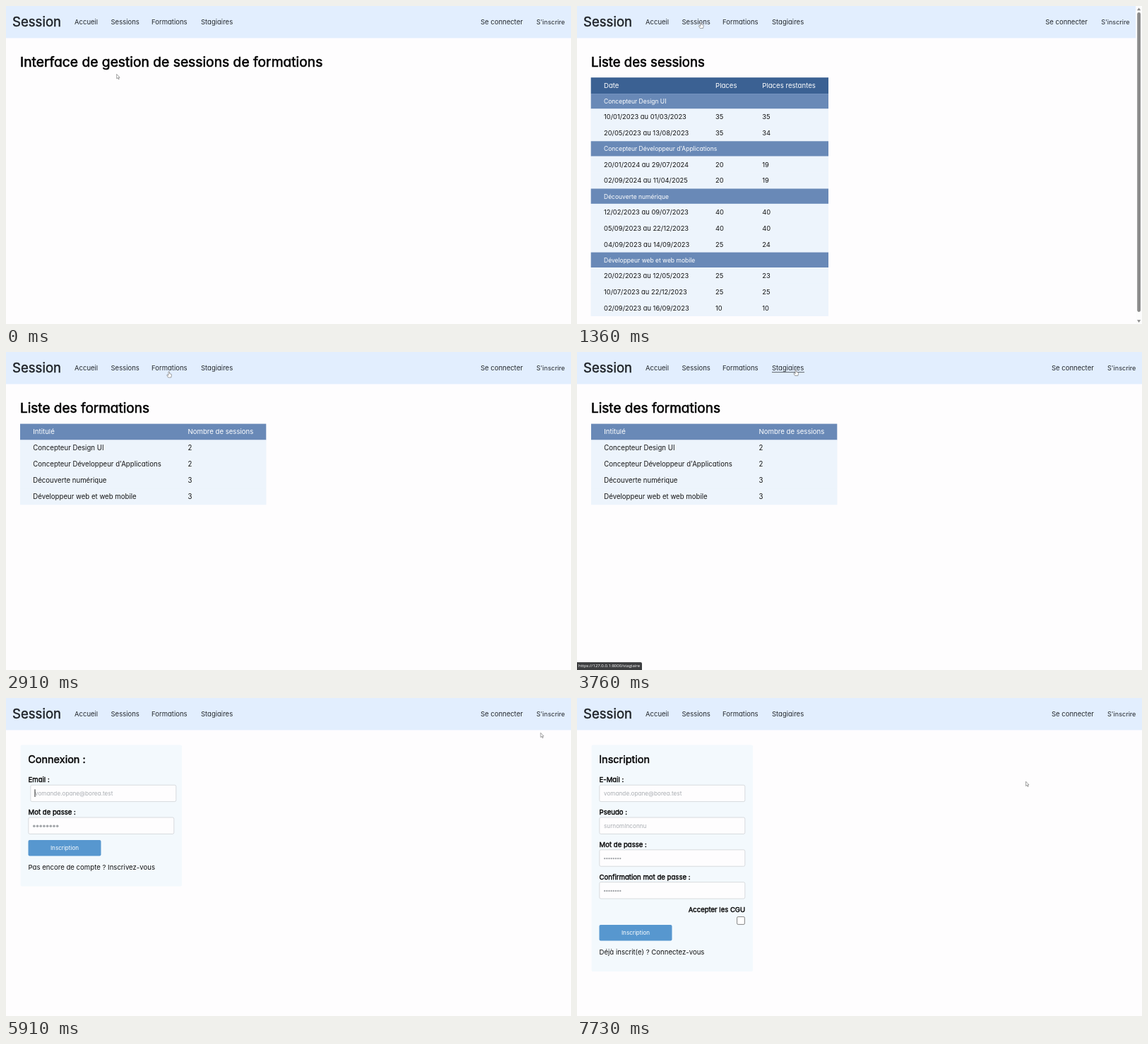
Animation of 800 by 450 pixels, one loop 7760 ms. Source, as an HTML page:

```html
<!DOCTYPE html>
<html lang="fr">
<head>
<meta charset="utf-8">
<title>Session</title>
<style>
html, body { margin: 0; width: 100%; height: 100%; overflow: hidden; background: #fefdfe; }
svg { position: absolute; left: 0; top: 0; width: 800px; height: 450px; font-family: Inter, "Open Sans", sans-serif; font-feature-settings: "cv11"; }
.bold { stroke: currentColor; paint-order: stroke; }
#status { position: absolute; left: 0; top: 439.3px; height: 10.7px; padding: 0 3px 0 2px; background: #202124; color: #fff;
  font: 6px/10.4px "Open Sans", sans-serif; border-top-right-radius: 2px; white-space: nowrap; }
</style>
</head>
<body>
<svg viewBox="0 0 800 450">
  <rect id="bar" width="800" height="45.4" fill="#e2eefe"/>
  <g id="nav"></g>
  <g id="right"></g>
  <g id="pages"></g>
  <path id="line" stroke="#3a3f45" stroke-width=".8"/>
</svg>
<div id="status"></div>
<svg viewBox="0 0 800 450">
  <g id="cursor" fill="#fff" stroke="#555" stroke-width=".55" stroke-linejoin="round">
    <path id="arrow" d="M0 0V6.3L1.5 5 2.6 7.3 3.5 6.9 2.5 4.7H4.4Z"/>
    <path id="hand" d="M-.3 0Q.5 -1 1.3 0V2.6L3.8 3.4Q4.3 3.7 4.1 4.9L3.5 8H-.7L-2.5 5Q-2.5 3.8 -1.4 4.3L-.3 5.2Z"/>
  </g>
</svg>
<script>
const LOOP = 7760;
const $ = id => document.getElementById(id);

const text = (x, y, s, size = 9.6, color = '#111', more = '') =>
  `<text x="${x}" y="${y}" font-size="${size}" fill="${color}" ${more}>${s}</text>`;
const bold = (x, y, s, size, width, color = '#000', more = '') =>
  text(x, y, s, size, color, `class="bold" style="color:${color};stroke-width:${width}" ${more}`);
const rect = (x, y, w, h, fill, more = '') =>
  `<rect x="${x}" y="${y}" width="${w}" height="${h}" fill="${fill}" ${more}/>`;
const title = (s, size = 19) => bold(20, 85.6, s, size, .6);

// Row kinds: height, background, text colour, text size
const KINDS = {
  dark: [22.9, '#3b6193', '#fff', 9.6],
  head: [22.9, '#6989b7', '#fff', 9.6],
  sub: [21.4, '#6989b7', '#fff', 8.5],
  row: [22.9, '#edf4fc', '#151515', 9.65],
  date: [22.9, '#edf4fc', '#151515', 9.35]
};

function table(left, top, width, cols, rows) {
  let y = top, fills = '', texts = '';
  for (const [kind, ...cells] of rows) {
    const [h, fill, color, size] = KINDS[kind];
    fills += rect(left, y, width, h, fill);
    cells.forEach((c, i) => texts += text(cols[i], y + h / 2 + 3.4, c, size, color));
    y += h;
  }
  // The backing hides seams between rows
  return rect(left, top + 1, width, y - top - 1, KINDS.row[1]) + fills + texts;
}

const scrollbar = rect(791.3, 0, 8.7, 450, '#fcfcfc') + rect(793.2, 9, 4.8, 424, '#8b8b8b', 'rx="2.4"') +
  '<path d="M793 6.3 795.6 2.6 798.2 6.3ZM793 444.3 795.6 448 798.2 444.3Z" fill="#8b8b8b"/>';

const card = h => rect(20.5, 66.5, 228.5, h, '#f3f9fd', 'rx="2"');
const box = y => rect(31.8, y, 206, 23.4, '#fefdfe', 'rx="2" stroke="#cfd2d6" stroke-width=".8"');
const hint = (y, s) => text(38, y + 14.6, s, 8.2, '#a9adb2');
const label = (y, s) => bold(31.5, y, s, 9.6, .35);
const dots = (y, r, step) => Array.from({ length: 8 }, (_, i) =>
  `<circle cx="${38 + r + i * step}" cy="${y + 12.3}" r="${r}" fill="#a3a6aa"/>`).join('');
const button = y => rect(31.5, y, 103, 22.6, '#5797cf', 'rx="2"') +
  text(83, y + 14.2, 'Inscription', 8.1, '#fff', 'text-anchor="middle"');
const mail = 'vomande.opane@borea.test';

const pages = [
  { start: 0, body: title('Interface de gestion de sessions de formations', 19.25) },
  { start: 1360, scroll: true, body: title('Liste des sessions', 18.6) + scrollbar +
    table(19.7, 101.2, 336.3, [38, 196, 262.3], [
      ['dark', 'Date', 'Places', 'Places restantes'],
      ['sub', 'Concepteur Design UI'],
      ['date', '10/01/2023 au 01/03/2023', 35, 35],
      ['date', '20/05/2023 au 13/08/2023', 35, 34],
      ['sub', 'Concepteur Développeur d\'Applications'],
      ['date', '20/01/2024 au 29/07/2024', 20, 19],
      ['date', '02/09/2024 au 11/04/2025', 20, 19],
      ['sub', 'Découverte numérique'],
      ['date', '12/02/2023 au 09/07/2023', 40, 40],
      ['date', '05/09/2023 au 22/12/2023', 40, 40],
      ['date', '04/09/2023 au 14/09/2023', 25, 24],
      ['sub', 'Développeur web et web mobile'],
      ['date', '20/02/2023 au 12/05/2023', 25, 23],
      ['date', '10/07/2023 au 22/12/2023', 25, 25],
      ['date', '02/09/2023 au 16/09/2023', 10, 10]
    ]) },
  { start: 2790, body: title('Liste des formations') + table(20, 101.6, 348.3, [38.3, 257.5], [
      ['head', 'Intitulé', 'Nombre de sessions'],
      ['row', 'Concepteur Design UI', 2],
      ['row', 'Concepteur Développeur d\'Applications', 2],
      ['row', 'Découverte numérique', 3],
      ['row', 'Développeur web et web mobile', 3]
    ]) },
  { start: 4120, body: title('Liste de stagiaires') + table(20, 101.6, 213.8, [38.3, 165], [
      ['head', 'Nom', 'Ville'],
      ['row', 'BELVORNAY Lucien', 'Strasbourg'],
      ['row', 'KERVALD Mélinor', 'Strasbourg'],
      ['row', 'IVOLA Zoé', 'Mulhouse']
    ]) },
  { start: 5480, body: card(200) + bold(31.2, 92, 'Connexion :', 14.5, .45) +
    label(119.4, 'Email :') + `<g id="email">${box(123.2)}${hint(123.2, mail)}` +
    '<path id="caret" d="M38 129.3V140" stroke="#111" stroke-width=".9"/></g>' +
    label(165.2, 'Mot de passe :') + box(169) + dots(169, 1.8, 4.7) + button(201) +
    text(31.5, 243, 'Pas encore de compte ? Inscrivez-vous') },
  { start: 6780, body: card(320.5) + bold(31.2, 92, 'Inscription', 14.5, .45) +
    ['E-Mail :', 'Pseudo :', 'Mot de passe :', 'Confirmation mot de passe :'].map((s, i) => {
      const y = 123.2 + i * 45.8;
      return label(y - 3.8, s) + box(y) + (i < 2 ? hint(y, [mail, 'surnomInconnu'][i]) : dots(y, 1.2, 3.15));
    }).join('') +
    bold(238, 303.2, 'Accepter les CGU', 9.5, .35, '#000', 'text-anchor="end"') +
    rect(226.6, 309.6, 10.8, 10.8, '#fff', 'rx="1.5" stroke="#767676" stroke-width=".9"') +
    button(321) + text(31.5, 362.6, 'Déjà inscrit(e) ? Connectez-vous') }
];

// Links: left, right, label, text size
const links = [
  [97, 130, 'Accueil'], [148.5, 188, 'Sessions'], [206, 258, 'Formations'], [276, 322, 'Stagiaires'],
  [672, 732.3, 'Se connecter'], [751, 790.8, 'S\'inscrire', 9.1]
];
const linkText = ([x, , s, size = 9.5]) => text(x, 25.9, s, size, '#24292e');
$('nav').innerHTML = bold(9, 29.4, 'Session', 18.6, .4, '#1d2126') + links.slice(0, 4).map(linkText).join('');
$('right').innerHTML = links.slice(4).map(linkText).join('');
$('pages').innerHTML = pages.map(p => `<g>${p.body}</g>`).join('');

// Status bubble: appears, gone, path
const bubbles = [
  [850, 1150, 'session'], [2160, 2640, 'formation'], [3580, 3970, 'stagiaire'],
  [5010, 5330, 'login'], [6300, 6620, 'register']
];

// Pointer stops: time, x, y
const stops = [
  [0, 156.7, 96.5], [30, 156.7, 96.5], [790, 175, 23.5], [1600, 175, 23.5], [2150, 230.3, 28],
  [2950, 230.3, 28], [3560, 309.4, 25.5], [4230, 309.4, 25.5], [5030, 721.3, 26.5], [5560, 721.3, 26.5],
  [5910, 757, 49.3], [6240, 766, 27.5], [6990, 766, 27.5], [7390, 663, 119], [7570, 663, 119],
  [7730, 635.6, 118.2], [LOOP, 635.6, 118.2]
];
const clamp = v => Math.max(0, Math.min(1, v));

function pointer(t) {
  const i = stops.findIndex(s => s[0] > t);
  const [t0, x0, y0] = stops[i - 1], [t1, x1, y1] = stops[i];
  const u = (t - t0) / (t1 - t0), k = u * u * (3 - 2 * u);
  return [x0 + (x1 - x0) * k, y0 + (y1 - y0) * k];
}

function draw(t) {
  const page = pages.findLast(p => p.start <= t);
  [...$('pages').children].forEach((g, i) => g.style.display = pages[i] === page ? '' : 'none');
  $('bar').setAttribute('width', page.scroll ? 791.3 : 800);
  $('right').setAttribute('transform', `translate(${page.scroll ? -8.8 : 0})`);

  const [x, y] = pointer(t);
  const link = y < 32 && links.find(l => x >= l[0] && x <= l[1]);
  // A fresh page only shows its hover style once the pointer has moved
  const [px, py] = pointer(page.start);
  const moved = Math.hypot(x - px, y - py) > .1;
  $('line').setAttribute('d', link && moved ? `M${link[0]} 28.6H${link[1]}` : '');
  $('cursor').setAttribute('transform', `translate(${x} ${y})`);
  $('hand').style.display = link ? '' : 'none';
  $('arrow').style.display = link ? 'none' : '';

  const bubble = bubbles.find(b => t >= b[0] && t < b[1]);
  $('status').style.opacity = bubble ? Math.min(clamp((t - bubble[0]) / 210), clamp((bubble[1] - t) / 90)) : 0;
  if (bubble) $('status').textContent = 'https://127.0.0.1:8000/' + bubble[2];

  const age = t - 5480;
  $('email').setAttribute('transform', `translate(${3 * clamp(age / 300)})`);
  $('caret').style.display = age % 1060 < 530 ? '' : 'none';
}

const begin = performance.now();
function tick() {
  draw((performance.now() - begin) % LOOP);
  requestAnimationFrame(tick);
}
tick();
</script>
</body>
</html>
```
